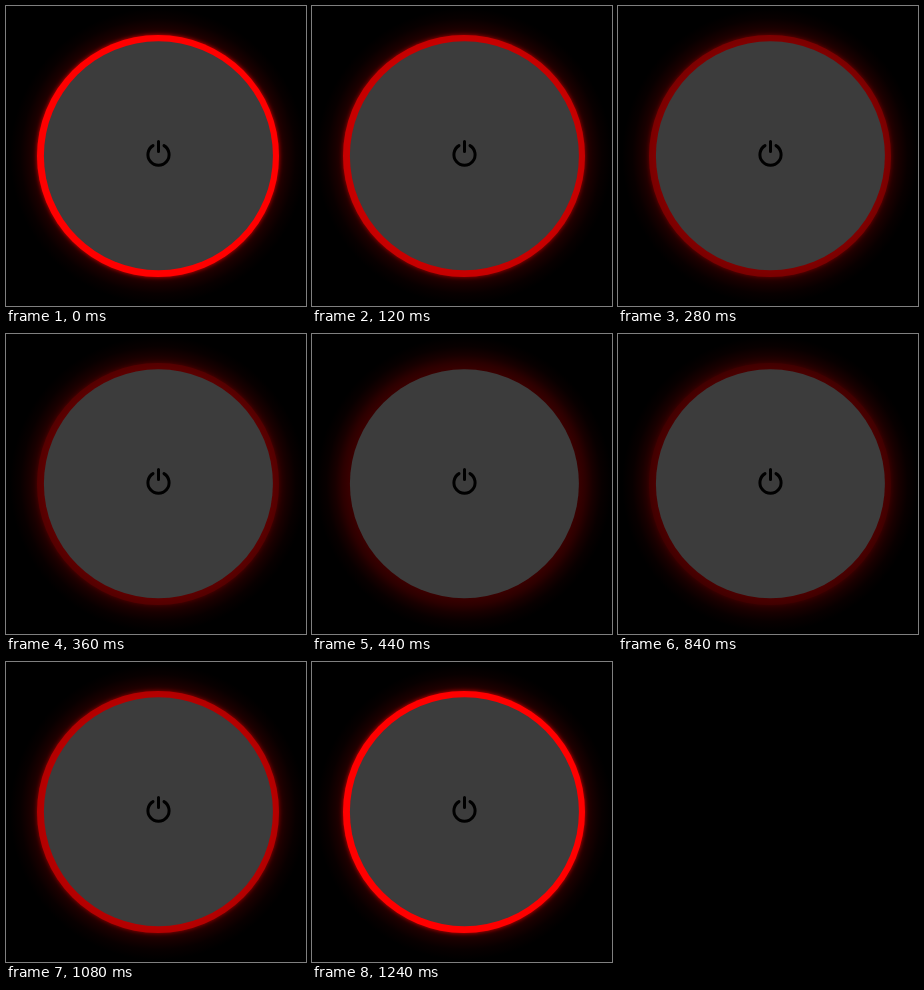
Recreate the animation shown at these times as an HTML page. Size 300 by 300 pixels, loop 1.48 s.

```html
<!DOCTYPE html>
<html lang="en">
<head>
<meta charset="utf-8">
<title>Power button</title>
<style>
  html, body { margin: 0; height: 100%; overflow: hidden; background: #000; }
  svg { display: block; width: 100vw; height: 100vh; }
</style>
</head>
<body>
<svg viewBox="0 0 300 300">
  <defs>
    <radialGradient id="glow" gradientUnits="userSpaceOnUse" cx="152" cy="150" r="148">
      <stop offset=".77" stop-color="#3a0000"/>
      <stop offset=".82" stop-color="#2c0000"/>
      <stop offset=".87" stop-color="#180000"/>
      <stop offset=".93" stop-color="#080000"/>
      <stop offset="1" stop-color="#000"/>
    </radialGradient>
    <filter id="blur" x="-10%" y="-10%" width="120%" height="120%">
      <feGaussianBlur stdDeviation="2"/>
    </filter>
  </defs>
  <rect width="300" height="300" fill="url(#glow)"/>
  <g id="ring" fill="#f00">
    <circle cx="152" cy="150" r="121" filter="url(#blur)" opacity=".8"/>
    <circle cx="152" cy="150" r="121"/>
  </g>
  <circle cx="152.4" cy="149.8" r="114.5" fill="#3c3c3c"/>
  <path d="M147 139.6A10.6 10.6 0 1 0 158 139.6M152.5 135.5V145.5"
        fill="none" stroke="#000" stroke-width="3" stroke-linecap="round"/>
</svg>
<script>
  const LOOP = 1480, STEP = 40, STEPS = 11;
  const ring = document.getElementById('ring');
  const start = performance.now();

  // Fade out, stay dark, fade in, stay lit; all in discrete steps
  function level(t) {
    const k = Math.floor(t / STEP);
    return Math.min(1, Math.max(0, 1 - k / STEPS, (k - 20) / STEPS));
  }

  function draw(now) {
    ring.setAttribute('opacity', level(Math.max(0, now - start) % LOOP));
    requestAnimationFrame(draw);
  }
  draw(start);
</script>
</body>
</html>
```
